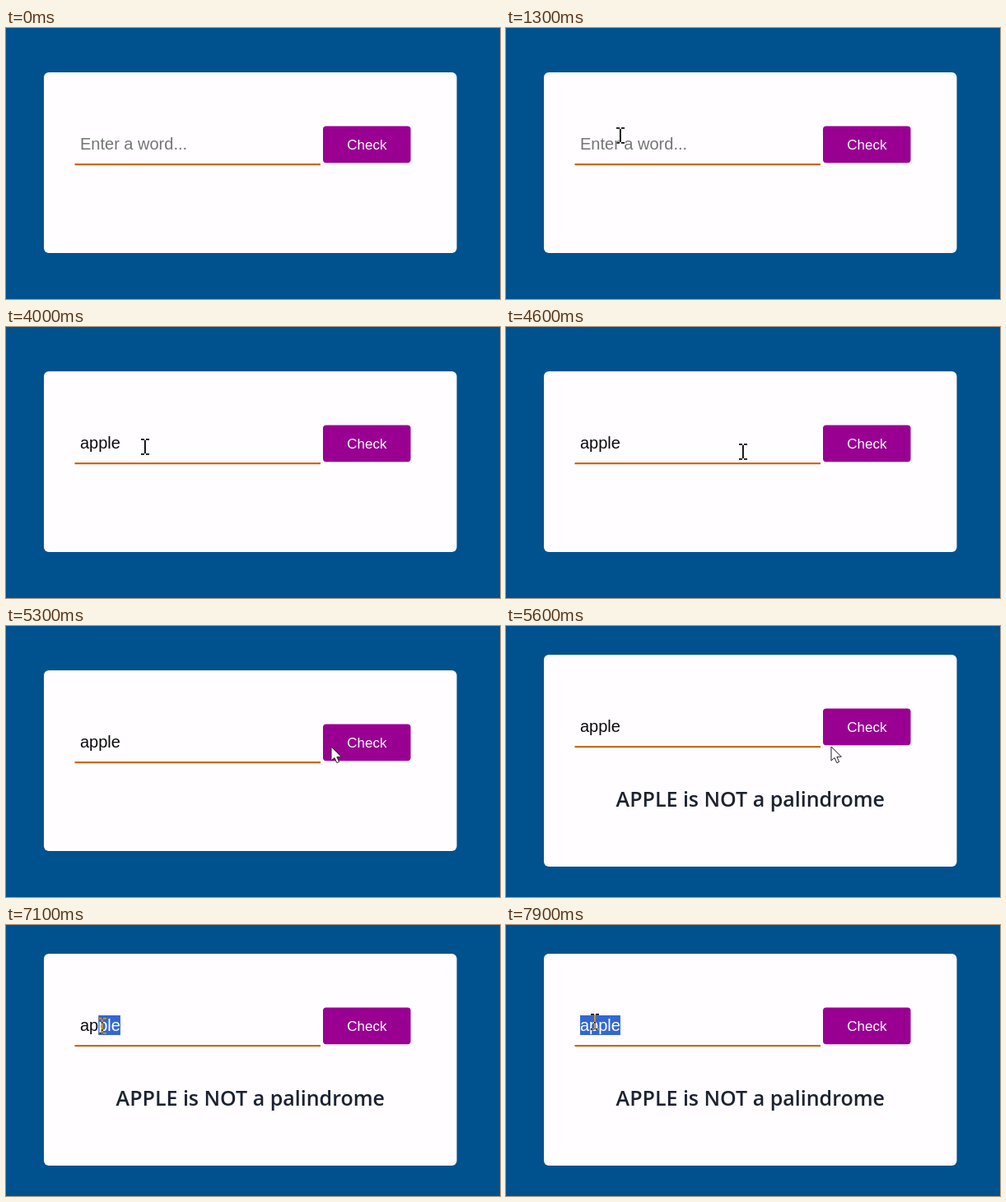
An HTML page with a canvas that plays this animation: 600x330 px, repeating every 8000 ms.

```html
<!DOCTYPE html>
<html lang="en">
<head>
<meta charset="utf-8">
<title>Palindrome checker</title>
<style>
html, body { margin: 0; width: 100%; height: 100%; overflow: hidden; background: #00528f; }
canvas { display: block; width: 600px; height: 330px; }
</style>
</head>
<body>
<canvas id="stage"></canvas>
<script>
const LOOP = 8000, STEP = 100;
const SANS = '"Liberation Sans", Arial, sans-serif';
const INPUT_FONT = `20px ${SANS}`;
const TEXT_X = 90;
const FOCUS = 1400, BLUR = 5200, RESULT = 5400, DRAG = 7000;
const KEYS = [[1700, 'a'], [2100, 'p'], [2300, 'p'], [2600, 'l'], [3100, 'e']];
const PATH = [
  [100, 543, 205], [500, 340, 170], [900, 139, 131], [3500, 139, 131],
  [4000, 169, 146], [4500, 262, 153], [5000, 391, 148], [5200, 395, 147],
  [5700, 395, 147], [6400, 218, 143], [6900, 147, 124], [7300, 87, 122],
  [7500, 87, 122], [7900, 108, 118]
];

const canvas = document.getElementById('stage');
const ctx = canvas.getContext('2d');
const dpr = window.devicePixelRatio || 1;
canvas.width = 600 * dpr;
canvas.height = 330 * dpr;

function panel(x, y, w, h, r, color) {
  ctx.fillStyle = color;
  ctx.beginPath();
  ctx.roundRect(x, y, w, h, r);
  ctx.fill();
}

function label(text, x, y, font, color, align = 'left') {
  ctx.font = font;
  ctx.fillStyle = color;
  ctx.textAlign = align;
  ctx.fillText(text, x, y);
}

function widthOf(text) {
  ctx.font = INPUT_FONT;
  return ctx.measureText(text).width;
}

function pointerAt(t) {
  if (t < PATH[0][0]) return null;
  const i = PATH.findIndex(p => p[0] > t);
  if (i < 0) return PATH[PATH.length - 1].slice(1);
  const [t0, x0, y0] = PATH[i - 1], [t1, x1, y1] = PATH[i];
  const k = (t - t0) / (t1 - t0);
  return [x0 + (x1 - x0) * k, y0 + (y1 - y0) * k];
}

function drawArrow(x, y) {
  const points = [[0, 0], [0, 17], [4, 13.4], [6.8, 19.6], [9.6, 18.4], [6.9, 12.4], [12.3, 12.2]];
  ctx.beginPath();
  points.forEach(([px, py]) => ctx.lineTo(x + px, y + py));
  ctx.closePath();
  ctx.fillStyle = '#fff';
  ctx.fill();
  ctx.strokeStyle = '#222';
  ctx.lineWidth = 1;
  ctx.stroke();
}

// The text pointer inverts whatever lies below it.
function drawBeam(x, y) {
  ctx.save();
  ctx.translate(Math.round(x), Math.round(y));
  ctx.globalCompositeOperation = 'difference';
  ctx.fillStyle = '#fff';
  for (const top of [-10, 8]) {
    ctx.fillRect(-5, top, 4, 1.7);
    ctx.fillRect(1, top, 4, 1.7);
  }
  ctx.fillRect(-1, -8.3, 1.8, 16.3);
  ctx.restore();
}

function drawSelection(word, x, dy) {
  let first = 0;
  while (first < word.length && TEXT_X + widthOf(word.slice(0, first + 1)) < x) first++;
  const left = TEXT_X + widthOf(word.slice(0, first));
  const width = TEXT_X + widthOf(word) - left;
  if (width <= 0) return;
  ctx.fillStyle = '#3367d1';
  ctx.fillRect(left, 129 + dy, width, 24);
  label(word.slice(first), left, 148 + dy, INPUT_FONT, '#fff');
}

function draw(t) {
  const done = t >= RESULT;
  const dy = done ? -19 : 0;
  const typed = KEYS.filter(k => k[0] <= t);
  const word = typed.map(k => k[1]).join('');
  const pointer = pointerAt(t);

  ctx.setTransform(dpr, 0, 0, dpr, 0, 0);
  ctx.fillStyle = '#00528f';
  ctx.fillRect(0, 0, 600, 330);
  panel(46, 54 + dy, 501.5, done ? 258 : 220, 6, '#fffdff');
  ctx.fillStyle = '#cb6715';
  ctx.fillRect(83.5, 165 + dy, 298.5, 2.2);
  panel(385, 119.5 + dy, 106.5, 44.7, 4, '#990092');
  label('Check', 438.3, 147.8 + dy, `17px ${SANS}`, '#fff', 'center');

  if (word) label(word, TEXT_X, 148 + dy, INPUT_FONT, '#0b0b0b');
  else label('Enter a word...', TEXT_X, 148, INPUT_FONT, '#757575');

  if (t >= FOCUS && t < BLUR) {
    const since = t - (typed.length ? typed[typed.length - 1][0] : FOCUS);
    if (since % 1000 < 500) {
      ctx.fillStyle = '#000';
      ctx.fillRect(Math.floor(TEXT_X + widthOf(word)), 130, 1.2, 22);
    }
  }

  if (done) {
    label('APPLE is NOT a palindrome', 296.8, 220.3,
      '600 25px "Open Sans", sans-serif', '#1b2232', 'center');
  }
  if (t >= DRAG) drawSelection(word, t < 7300 ? pointer[0] : TEXT_X, dy);

  if (pointer) {
    const [x, y] = pointer;
    const overInput = x > 83 && x < 382 && y > 115 + dy && y < 167 + dy;
    (overInput ? drawBeam : drawArrow)(x, y);
  }
}

const start = performance.now();
function frame() {
  const t = (performance.now() - start) % LOOP;
  draw(Math.floor(t / STEP) * STEP);
  requestAnimationFrame(frame);
}
frame();
</script>
</body>
</html>
```
